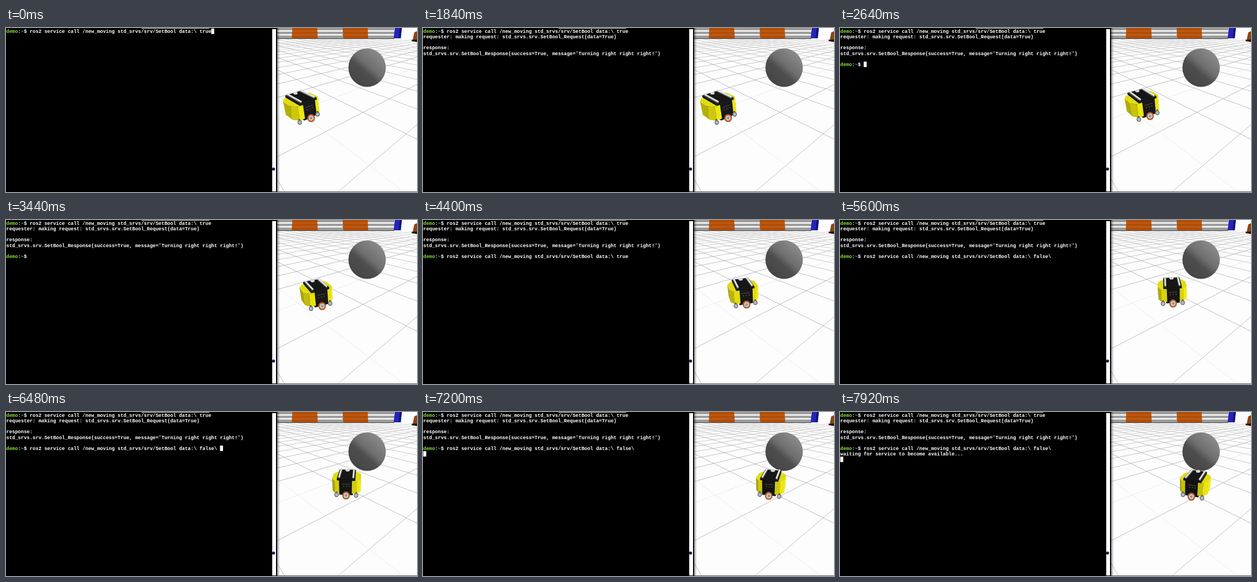
Recreate the animation shown at these times as an HTML page with a canvas. Size 758 px wide and 302 px high, loop 8 s.

```html
<!DOCTYPE html>
<html lang="en">
<head>
<meta charset="utf-8">
<title>Robot service call</title>
<style>
  html, body { margin: 0; width: 100%; height: 100%; overflow: hidden; background: #000; }
  canvas { display: block; }
</style>
</head>
<body>
<canvas id="stage" width="758" height="302"></canvas>
<script>
const ctx = document.getElementById('stage').getContext('2d');
const LOOP = 8000;

function rect(x, y, w, h, color) {
  ctx.fillStyle = color;
  ctx.fillRect(x, y, w, h);
}
function poly(points, color) {
  ctx.beginPath();
  points.forEach(([x, y]) => ctx.lineTo(x, y));
  ctx.closePath();
  ctx.fillStyle = color;
  ctx.fill();
}
function line(x1, y1, x2, y2, color, width) {
  ctx.beginPath();
  ctx.moveTo(x1, y1);
  ctx.lineTo(x2, y2);
  ctx.strokeStyle = color;
  ctx.lineWidth = width;
  ctx.stroke();
}
function ellipse(x, y, rx, ry, color) {
  ctx.beginPath();
  ctx.ellipse(x, y, rx, ry, 0, 0, 2 * Math.PI);
  ctx.fillStyle = color;
  ctx.fill();
}

// ---------- terminal ----------
const CHAR = 5.4, ROW = 10.15;
const PROMPT = 'demo:~$ ';
const COMMAND = 'ros2 service call /new_moving std_srvs/srv/SetBool data:\\ ';
const OLD_ARG = 'true', NEW_ARG = 'false\\ ';
const ENTER_1 = 400, REQUEST = 1280, RESPONSE = 1600, PROMPT_2 = 2100, RECALL = 3900,
      ERASE = 4560, TYPE = 4960, ENTER_2 = 7000, WAITING = 7400, KEY = 80;

function secondCommand(t) {
  if (t < RECALL) return '';
  if (t < ERASE) return COMMAND + OLD_ARG;
  if (t < TYPE) return COMMAND + OLD_ARG.slice(0, Math.max(0, 3 - Math.floor((t - ERASE) / KEY)));
  return COMMAND + NEW_ARG.slice(0, 1 + Math.floor((t - TYPE) / KEY));
}

function terminalRows(t) {
  const rows = [PROMPT + COMMAND + OLD_ARG];
  if (t >= ENTER_1) rows.push('');
  if (t >= REQUEST) rows.splice(1, 1, 'requester: making request: std_srvs.srv.SetBool_Request(data=True)', '', '');
  if (t >= RESPONSE) rows.splice(3, 1, 'response:',
    "std_srvs.srv.SetBool_Response(success=True, message='Turning right right right!')", '', '');
  if (t >= PROMPT_2) rows[6] = PROMPT + secondCommand(t);
  if (t >= ENTER_2) rows.push('');
  if (t >= WAITING) rows.splice(7, 1, 'waiting for service to become available...', '');
  return rows;
}

function drawTerminal(t) {
  rect(0, 0, 500, 302, '#000');
  ctx.font = 'bold 9px "Liberation Mono", monospace';
  ctx.textBaseline = 'alphabetic';
  const rows = terminalRows(t);
  const write = (text, col, row, color) => {
    ctx.fillStyle = color;
    ctx.fillText(text, 0.5 + col * CHAR, 9 + row * ROW);
  };
  rows.forEach((text, row) => {
    if (text.startsWith(PROMPT)) {
      write('demo', 0, row, '#8ae234');
      write(':', 4, row, '#fff');
      write('~', 5, row, '#729fcf');
      write(text.slice(6), 6, row, '#fff');
    } else write(text, 0, row, '#fff');
  });
  const blink = (t < WAITING ? t : t - WAITING) % 1200;
  if (blink < 600) {
    const last = rows.length - 1;
    rect(0.5 + rows[last].length * CHAR, 1 + last * ROW, 5.5, 10, '#fff');
  }
  rect(250, 0, 125, 1, '#ddd');
  rect(491, 2, 7, 299, '#fff');
  ellipse(493.5, 259.8, 2.8, 2.8, '#15243c');
}

// ---------- scene ----------
const HORIZON = -10, FOCAL = 291.6, CENTER = [629, 151], CAMERA_HEIGHT = 2.03;
const PITCH = Math.atan2(CENTER[1] - HORIZON, FOCAL);
const COS = Math.cos(PITCH), SIN = Math.sin(PITCH);

function project(forward, right, z) {
  const drop = CAMERA_HEIGHT - z;
  const depth = forward * COS + drop * SIN;
  return [CENTER[0] + FOCAL * right / depth,
          CENTER[1] + FOCAL * (drop * COS - forward * SIN) / depth];
}

function drawGrid() {
  // Parallel ground lines share a vanishing point and are evenly spaced along the bottom edge.
  const family = (vanishX, firstX, step, from, to) => {
    for (let k = from; k <= to; k++) {
      const dx = firstX + step * k - vanishX;
      const shade = k === 0 ? 232 : 165 + 4 * Math.abs(k);
      line(vanishX, HORIZON, vanishX + dx * 3, HORIZON + 312 * 3,
           `rgb(${shade},${shade},${shade})`, 0.8);
    }
  };
  ctx.save();
  ctx.beginPath();
  ctx.rect(500, 21, 258, 281);
  ctx.clip();
  family(979, 136, 238, -13, 3);
  family(325, 734, 220, -2, 12);
  ctx.restore();
}

function drawBarrier() {
  const stripes = (x, w, color) => [4, 11].forEach(y => rect(x, y, w, 3, color));
  rect(500, 0, 216, 20, '#9c9c9c');
  stripes(500, 216, '#eee');
  [[528, -1], [621, 1]].forEach(([x, lean]) => {
    poly([[x, 0], [x + 46, 0], [x + 47, 20], [x + lean, 20]], '#b04e08');
    stripes(x, 46, '#bf5a12');
  });
  rect(500, 19, 216, 1.2, '#444');
  poly([[717, 0], [730, 0], [728, 19], [715, 19]], '#2424b8');
  poly([[726, 0], [730, 0], [728, 19], [724, 19]], '#14147c');
  poly([[753, 8], [758, 6], [758, 22], [750, 22]], '#8f4312');
  poly([[748, 22], [758, 21], [758, 26], [748, 24]], '#191919');
}

function drawBall() {
  const shade = ctx.createLinearGradient(692, 44, 642, 102);
  shade.addColorStop(0, '#8e8e8e');
  shade.addColorStop(0.45, '#6e6e6e');
  shade.addColorStop(0.62, '#4e4e4e');
  shade.addColorStop(1, '#444');
  ellipse(666, 73, 34.5, 35.5, shade);
}

// ---------- robot ----------
const START = 1960, START_ANGLE = 46.5 * Math.PI / 180, TURN_RATE = 0.1955, RADIUS = 1.34;
const mirror = points => points.map(([a, b]) => [-a, b]).reverse();
const BUMPER = [[0.14, -0.3], [0.27, -0.3], [0.36, -0.16], [0.36, 0.16], [0.27, 0.3], [0.14, 0.3]];
const box = (a, b) => [[-a, -b], [a, -b], [a, b], [-a, b]];
const yellow = light => `rgb(${195 + 50 * light},${190 + 50 * light},${10 + 10 * light})`;
const black = light => `rgb(${18 + 8 * light},${18 + 8 * light},${19 + 8 * light})`;

function drawRobot(t) {
  const angle = START_ANGLE - TURN_RATE * Math.max(0, t - START) / 1000;
  const c = Math.cos(angle), s = Math.sin(angle);
  const forward = 3.34 + RADIUS * (c - Math.cos(START_ANGLE));
  const right = -1.07 + RADIUS * (Math.sin(START_ANGLE) - s);
  // a runs along the heading, b toward the wheel side
  const at = (a, b, z) => project(forward + a * s - b * c, right + a * c + b * s, z);

  const prism = (outline, low, high, color) => {
    outline.forEach((p, i) => {
      const q = outline[(i + 1) % outline.length];
      const face = [at(...p, low), at(...q, low), at(...q, high), at(...p, high)];
      const [o, u, , v] = face;
      const facing = (u[0] - o[0]) * (v[1] - o[1]) - (u[1] - o[1]) * (v[0] - o[0]);
      if (facing < 0) return;
      const na = q[1] - p[1], nb = p[0] - q[0], n = Math.hypot(na, nb);
      const light = (0.8 * (na * c + nb * s) - 0.35 * (na * s - nb * c)) / n;
      poly(face, color(light));
    });
    poly(outline.map(p => at(...p, high)), color(0.6));
  };
  const bar = (a1, b1, z1, a2, b2, z2, color, width) =>
    line(...at(a1, b1, z1), ...at(a2, b2, z2), color, width);
  const wheel = (a, b, radius, color, hub) => {
    const [x, y] = at(a, b, radius);
    const size = radius * 76;
    ellipse(x, y, size * 0.94, size, color);
    ellipse(x, y, size * 0.62, size * 0.66, hub);
  };

  const parts = [
    [-0.27, () => prism(mirror(BUMPER), 0.14, 0.48, yellow)],
    [0, () => prism(box(0.17, 0.31), 0.1, 0.53, black)],
    [0.27, () => prism(BUMPER, 0.14, 0.48, yellow)]
  ];
  parts.sort((p, q) => q[0] * s - p[0] * s).forEach(([, draw]) => draw());
  prism(box(0.22, 0.31), 0.49, 0.54, black);

  [-0.17, 0.17].forEach(a => {
    bar(a, -0.31, 0.555, a, 0.31, 0.555, '#77797b', 4);
    bar(a, -0.31, 0.57, a, 0.31, 0.57, '#e4e6e8', 2.6);
  });
  ellipse(...at(0, -0.22, 0.56), 4, 2.6, '#d5d7d8');
  bar(-0.1, 0.315, 0.4, 0.1, 0.315, 0.4, '#55524b', 1);
  [-0.07, 0, 0.07].forEach(a => rect(...at(a, 0.315, 0.35), 1.5, 1.5, '#a66a3c'));

  [-1, 1].forEach(side => {
    bar(side * 0.25, 0.24, 0.15, side * 0.25, 0.24, 0.06, '#55585a', 3);
    wheel(side * 0.25, 0.24, 0.058, '#666a6c', '#b8babb');
  });
  wheel(0, 0.33, 0.098, '#b85a25', '#c9c9c6');
  ellipse(...at(0, 0.33, 0.098), 2, 2.2, '#8b8988');
}

function drawScene(t) {
  ctx.save();
  ctx.beginPath();
  ctx.rect(500, 0, 258, 302);
  ctx.clip();
  rect(500, 0, 258, 302, '#fdfdfd');
  drawGrid();
  drawBarrier();
  drawBall();
  drawRobot(t);
  const edge = ctx.createLinearGradient(500, 0, 505, 0);
  edge.addColorStop(0, 'rgba(0,0,0,0.4)');
  edge.addColorStop(1, 'rgba(0,0,0,0)');
  rect(500, 0, 5, 302, edge);
  rect(500, 301, 258, 1, '#555');
  ctx.restore();
}

function frame(now) {
  const t = now % LOOP;
  drawTerminal(t);
  drawScene(t);
  requestAnimationFrame(frame);
}
requestAnimationFrame(frame);
</script>
</body>
</html>
```
